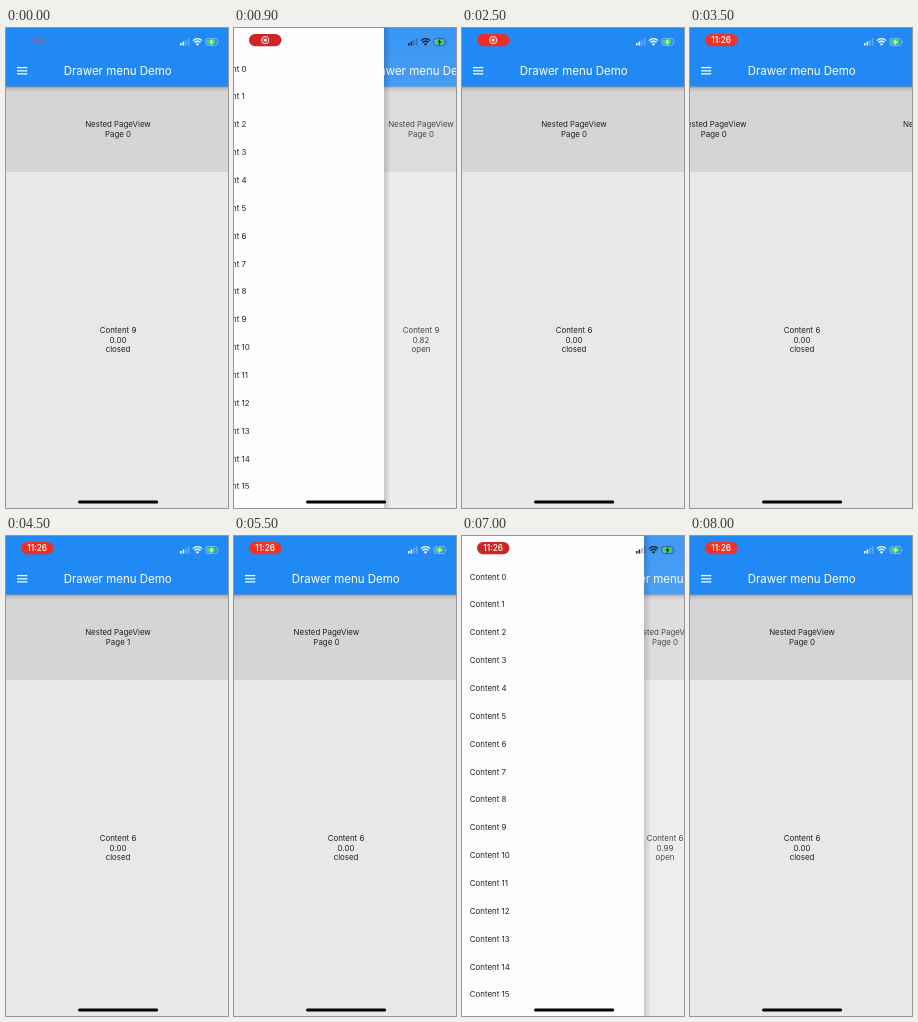
An HTML page that plays this animation: 222 by 480 pixels, repeating every 8.1 s.

```html
<!DOCTYPE html>
<html lang="en">
<head>
<meta charset="utf-8">
<title>Drawer menu Demo</title>
<style>
  html, body { margin: 0; width: 100%; height: 100%; overflow: hidden; background: #e9e7ea; }
  svg { display: block; width: 100vw; height: 100vh; }
  text { font-family: Inter, Roboto, sans-serif; font-size: 7.9px; fill: #222; }
  .mid { text-anchor: middle; }
  .title { font-size: 11.5px; fill: #fff; }
  .clock { font-size: 8.4px; font-weight: 500; fill: #fff; }
</style>
</head>
<body>
<svg viewBox="0 0 222 480">
  <defs>
    <linearGradient id="barShade" x2="0" y2="1">
      <stop offset="0" stop-color="#000" stop-opacity=".34"/>
      <stop offset=".4" stop-color="#000" stop-opacity=".12"/>
      <stop offset="1" stop-color="#000" stop-opacity="0"/>
    </linearGradient>
    <linearGradient id="edgeShade">
      <stop offset="0" stop-color="#000" stop-opacity=".16"/>
      <stop offset="1" stop-color="#000" stop-opacity="0"/>
    </linearGradient>
    <linearGradient id="veilFill" x2="0" y2="1">
      <stop offset="0" stop-color="#fff" stop-opacity=".14"/>
      <stop offset=".12" stop-color="#fff" stop-opacity=".2"/>
    </linearGradient>
    <clipPath id="listClip"><rect y="27" width="184" height="433.8"/></clipPath>
  </defs>

  <g id="main">
    <rect width="222" height="480" fill="#e9e7ea"/>
    <rect y="58" width="222" height="86" fill="#d6d4d7"/>
    <g id="pages"></g>
    <text class="mid" x="112" y="305" id="label"></text>
    <text class="mid" x="112" y="314.7" id="value"></text>
    <text class="mid" x="112" y="324.3" id="state"></text>
    <rect y="58" width="222" height="6" fill="url(#barShade)"/>
    <rect width="222" height="58.5" fill="#2089f3"/>
    <path d="M11 39.7h10.3M11 42.8h10.3M11 45.9h10.3" stroke="#fff" stroke-width="1.2"/>
    <text class="mid title" x="111.7" y="47">Drawer menu Demo</text>
    <rect id="veil" width="222" height="480" fill="url(#veilFill)"/>
  </g>

  <g id="drawer">
    <rect id="edge" x="184" width="7" height="480" fill="url(#edgeShade)"/>
    <rect width="184" height="480" fill="#fdfcfe"/>
    <g id="list" clip-path="url(#listClip)"></g>
  </g>

  <g id="pill">
    <rect id="pillBox" x="15" y="6" width="32.5" height="12.2" rx="6.1"/>
    <g id="rec">
      <circle cx="31.2" cy="12.1" r="3.6" fill="none" stroke="#fff" stroke-width=".9"/>
      <circle cx="31.2" cy="12.1" r="1.7" fill="#fff"/>
    </g>
    <text class="mid clock" x="31.2" y="15.2" id="clock">11:26</text>
  </g>
  <text class="mid clock" x="32" y="15" id="ghost" style="fill:#c4506c;font-size:7.4px" opacity=".75">11:26</text>

  <g id="status">
    <path d="M174 15h1.6v2.6h-1.6zM176.6 13.6h1.6v4h-1.6z"/>
    <path d="M179.2 12h1.6v5.6h-1.6zM181.8 10.3h1.6v7.3h-1.6z" opacity=".3"/>
    <path d="M191.5 17.8L189.8 16a2.4 2.4 0 0 1 3.4 0z"/>
    <g fill="none" stroke="currentColor" stroke-width="1.3">
      <path d="M188.5 14.5a4.2 4.2 0 0 1 6 0"/>
      <path d="M186.9 12.6a6.5 6.5 0 0 1 9.2 0"/>
    </g>
    <rect x="199.8" y="10.4" width="11.4" height="7.2" rx="2" fill="none" stroke="currentColor" stroke-width=".6" opacity=".6"/>
    <rect x="200.8" y="11.4" width="8.4" height="5.2" rx="1.1" fill="#4cd55f"/>
    <path d="M212 12.8q1.1 1.2 0 2.4z" opacity=".6"/>
    <path d="M206.5 10.4l-3.2 4.2h1.9l-.8 3.2 3.3-4.3h-2z"/>
  </g>
  <rect x="72" y="472.4" width="80.2" height="3" rx="1.5" fill="#000"/>
</svg>

<script>
const LOOP = 8100, WIDTH = 222, DRAWER = 184;
const $ = id => document.getElementById(id);

function addText(parent, x, y, str, cls = '') {
  const el = document.createElementNS('http://www.w3.org/2000/svg', 'text');
  el.setAttribute('x', x);
  el.setAttribute('y', y);
  el.setAttribute('class', cls);
  el.textContent = str;
  parent.append(el);
}

for (let i = 0; i < 2; i++) {
  addText($('pages'), 112 + i * WIDTH, 99.3, 'Nested PageView', 'mid');
  addText($('pages'), 112 + i * WIDTH, 108.8, 'Page ' + i, 'mid');
}
for (let i = 0; i < 16; i++) addText($('list'), 9.8, 43.6 + 27.85 * i, 'Content ' + i);

const ramp = (t, start, length) => Math.min(1, Math.max(0, (t - start) / length));
const ease = (t, start, length) => {
  const p = ramp(t, start, length);
  return p * p * (3 - 2 * p);
};
const mix = (a, b, k) => a.map((c, i) => Math.round(c + (b[i] - c) * k));
const moveX = (id, x) => $(id).setAttribute('transform', `translate(${x.toFixed(2)} 0)`);
const fade = (id, k) => $(id).setAttribute('opacity', k.toFixed(3));

function draw(t) {
  const open = ease(t, 600, 415) - ease(t, 2100, 382) + ease(t, 5900, 400) - ease(t, 6980, 345);
  const page = ease(t, 3200, 698) - ease(t, 5050, 552);

  moveX('main', open * DRAWER / 2);
  moveX('drawer', (open - 1) * DRAWER);
  moveX('pages', -page * WIDTH);
  fade('veil', open);
  fade('edge', Math.min(1, open * 10));

  $('label').textContent = 'Content ' + (t < 2100 ? 9 : 6);
  $('value').textContent = Math.abs(open).toFixed(2);
  $('state').textContent = open > 0.5 ? 'open' : 'closed';

  const ink = open > 0.25 ? '#1c1c1e' : '#fff';
  $('status').setAttribute('fill', ink);
  $('status').setAttribute('color', ink);

  // The recording pill pulses and later swaps its icon for the clock.
  const pulse = Math.max(0, Math.cos((t - 900) / 2033 * 2 * Math.PI));
  const shown = ramp(t, 50, 250), clock = ramp(t, 2700, 200);
  $('pillBox').setAttribute('fill', `rgb(${mix([242, 50, 38], [206, 37, 37], pulse)})`);
  fade('pill', shown);
  fade('ghost', 0.75 * (1 - shown));
  fade('rec', 1 - clock);
  fade('clock', clock);
}

const begin = performance.now();
function tick() {
  draw((performance.now() - begin) % LOOP);
  requestAnimationFrame(tick);
}
draw(0);
requestAnimationFrame(tick);
</script>
</body>
</html>
```
